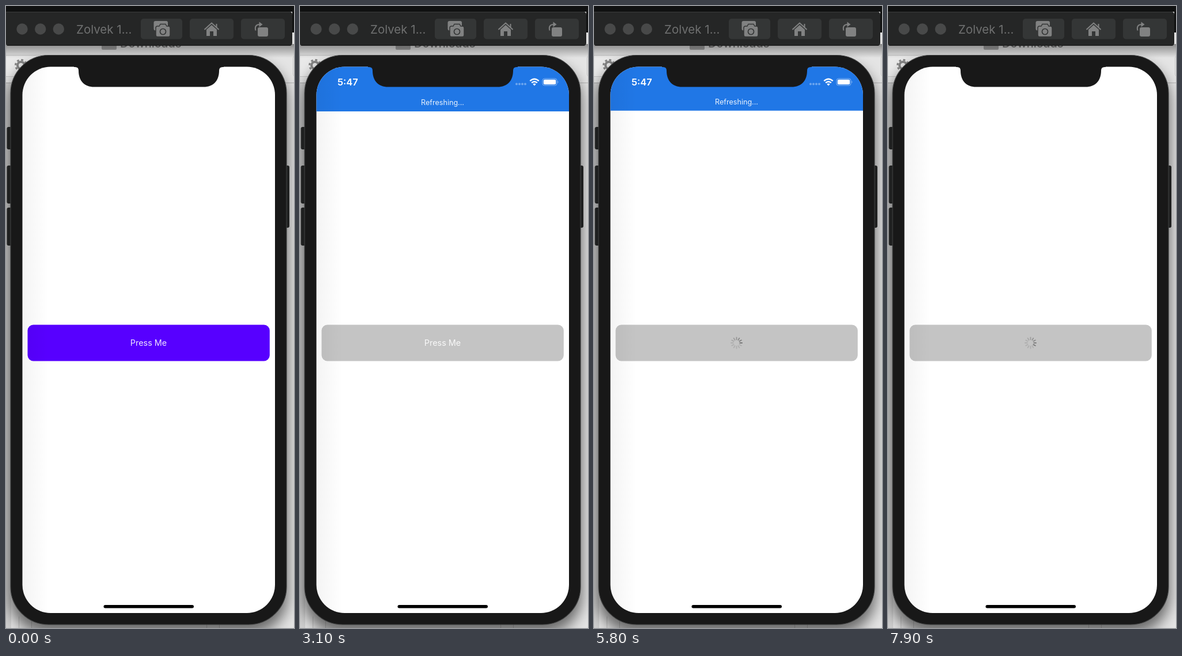
Recreate the animation shown at these times as an HTML page. Size 500 by 1080 pixels, loop 8 s.

```html
<!DOCTYPE html>
<html lang="en">
<head>
<meta charset="utf-8">
<title>Press Me</title>
<style>
  html, body { margin: 0; width: 100%; height: 100%; overflow: hidden; background: #111; }
  svg { display: block; width: 500px; height: 1080px; }
  text { font-family: Inter, "Liberation Sans", sans-serif; }
</style>
</head>
<body>
<svg viewBox="0 0 500 1080">
  <defs>
    <linearGradient id="edge">
      <stop offset="0" stop-opacity=".045"/>
      <stop offset=".5" stop-opacity=".022"/>
      <stop offset="1" stop-opacity="0"/>
    </linearGradient>
    <linearGradient id="barShade" x2="0" y2="1">
      <stop offset="0" stop-opacity=".4"/>
      <stop offset="1" stop-opacity="0"/>
    </linearGradient>
    <filter id="blur" x="-20%" y="-20%" width="140%" height="140%">
      <feGaussianBlur stdDeviation="12"/>
    </filter>
    <clipPath id="screen"><rect x="28.5" y="105.5" width="438.5" height="948.5" rx="49"/></clipPath>
  </defs>

  <!-- window behind the device -->
  <rect width="500" height="1080" fill="#e4e4e4"/>
  <path d="M0 133.5H500" stroke="#b4b4b4"/>
  <rect x="-8" y="85.500" width="171" height="37" rx="5" fill="#e9e9e9" stroke="#c4c4c4"/>
  <rect x="498.500" y="86" width="20" height="37" rx="5" fill="#eee" stroke="#c4c4c4"/>
  <path d="M22.500 1060V1080M44.500 1060V1080M348.500 1060V1080M370.500 1060V1080" stroke="#c2c2c2"/>
  <g stroke="#848484" fill="none">
    <circle cx="26" cy="103" r="6" stroke-width="4"/>
    <circle cx="26" cy="103" r="9.500" stroke-width="3" stroke-dasharray="3.730"/>
  </g>
  <rect x="166" y="54" width="26" height="22" rx="2" fill="#a2a2a2"/>
  <text x="198" y="72" font-size="20" font-weight="500" fill="#777">Downloads</text>
  <rect x="5" y="100" width="484" height="990" rx="66" opacity=".55" filter="url(#blur)"/>
  <rect y="133" width="9" height="947" opacity=".09"/>
  <rect y="66" width="500" height="24" fill="url(#barShade)"/>

  <!-- title bar -->
  <path d="M0 0H500V46H497V10H0Z" fill="#101111"/>
  <path d="M0 10H492Q497 10 497 15V64Q497 69 492 69H4Q0 69 0 65Z" fill="#252626"/>
  <path d="M0 10.500H493" stroke="#3b3c3c"/>
  <path d="M2 68.500H494" stroke="#121212"/>
  <g fill="#484949">
    <circle cx="28" cy="40" r="9.700"/><circle cx="59.700" cy="40" r="9.700"/><circle cx="91.300" cy="40" r="9.700"/>
  </g>
  <text x="122" y="48" font-size="20.500" fill="#6f7070">Zolvek 1...</text>
  <g fill="#343636">
    <rect x="234" y="22" width="72" height="35.500" rx="5"/>
    <rect x="319" y="22" width="76" height="35.500" rx="5"/>
    <rect x="408" y="22" width="76" height="35.500" rx="5"/>
  </g>
  <g fill="#818282">
    <rect x="256.500" y="26" width="24.500" height="16.500" rx="3"/>
    <path d="M263 35H266L268 31.500H277L279 35H282Q285 35 285 38V50.500Q285 53.500 282 53.500H263Q260 53.500 260 50.500V38Q260 35 263 35Z" stroke="#343636" stroke-width="1.500"/>
    <circle cx="272.500" cy="44.500" r="5" fill="none" stroke="#343636" stroke-width="1.700"/>
    <path d="M348 41L357 33L366 41V52H360V44H354V52H348Z"/>
    <path d="M344.500 41L357 29.500L369.500 41M365.500 31V37" fill="none" stroke="#818282" stroke-width="2"/>
    <rect x="437" y="37" width="18" height="16" rx="3"/>
    <path d="M433.500 42.500C431.500 36 434 32 441 32" fill="none" stroke="#818282" stroke-width="2"/>
    <path d="M439.500 27.500L445.500 32L439.500 36.500Z"/>
  </g>

  <!-- device -->
  <g fill="#1f2020">
    <rect x="1.500" y="210" width="10" height="39" rx="3"/>
    <rect x="1.500" y="277" width="10" height="66" rx="3"/>
    <rect x="1.500" y="350" width="10" height="66" rx="3"/>
    <rect x="482" y="277" width="10" height="108" rx="3"/>
  </g>
  <rect x="8" y="85.500" width="479" height="988.500" rx="66" fill="#181818" stroke="#3d3e3e" stroke-width="1.200"/>

  <g clip-path="url(#screen)">
    <rect x="28" y="105" width="440" height="950" fill="#fff"/>
    <rect id="button" x="37.500" y="553.500" width="420.300" height="63" rx="10"/>
    <text id="label" x="247.500" y="590" font-size="14.400" text-anchor="middle" fill="#fff" opacity=".9">Press Me</text>
    <g id="spinner" transform="translate(247.500 585)" stroke="#737373" stroke-width="1.800" stroke-linecap="round"></g>
    <g id="banner">
      <rect x="28" y="105" width="440" height="79" fill="#2077e6"/>
      <text x="247.500" y="173" font-size="12.600" text-anchor="middle" fill="#fff" opacity=".9">Refreshing...</text>
    </g>
    <g fill="#fff">
      <text x="65" y="138" font-size="16.500" font-weight="600">5:47</text>
      <g opacity=".35">
        <circle cx="376" cy="135.500" r="2"/><circle cx="381" cy="135.500" r="2"/>
        <circle cx="386" cy="135.500" r="2"/><circle cx="391" cy="135.500" r="2"/>
      </g>
      <g fill="none" stroke="#fff" stroke-width="2.400">
        <path d="M399.300 130.200Q407 123.200 414.700 130.200"/>
        <path d="M402.200 133.300Q407 129 411.800 133.300"/>
      </g>
      <path d="M404.300 135.600Q407 133.400 409.700 135.600L407 138.500Z"/>
      <rect x="421" y="126" width="25" height="12" rx="3.500" fill="none" stroke="#fff" opacity=".45"/>
      <rect x="422.800" y="127.700" width="21.400" height="8.600" rx="2"/>
      <path d="M447.500 130Q449.500 132 447.500 134Z" opacity=".5"/>
    </g>
    <rect x="28.500" y="105" width="46" height="950" fill="url(#edge)"/>
  </g>
  <path d="M118 104V106H120Q126 106 126 112C126 130 136 140.500 153 140.500H343C360 140.500 370 130 370 112Q370 106 376 106H378V104Z" fill="#181818"/>
  <rect x="169.500" y="1040" width="156.500" height="5.400" rx="2.700"/>
</svg>
<script>
  const LOOP = 8000, STEP = 100;
  const SHOW = [2480, 5170], HOLD = 600, SLIDE = 250, BANNER_H = 79;
  const GREY_AT = 2700, LOADING_AT = 5400;
  const SPOKES = 12, TURN = 1000, PHASE = 5.5;

  const $ = id => document.getElementById(id);
  const button = $('button'), label = $('label'), spinner = $('spinner'), banner = $('banner');
  const show = (el, on) => el.setAttribute('visibility', on ? 'visible' : 'hidden');

  const spokes = Array.from({ length: SPOKES }, (_, i) => {
    const line = document.createElementNS('http://www.w3.org/2000/svg', 'line');
    line.setAttribute('y1', -5.7);
    line.setAttribute('y2', -9.6);
    line.setAttribute('transform', `rotate(${i * 360 / SPOKES})`);
    return spinner.appendChild(line);
  });

  const easeInOut = p => p < .5 ? 2 * p * p : 1 - 2 * (1 - p) ** 2;

  function drawBanner(t) {
    const start = SHOW.find(s => t >= s && t < s + HOLD + SLIDE);
    show(banner, start !== undefined);
    if (start === undefined) return;
    const p = Math.max(0, (t - start - HOLD) / SLIDE);
    banner.setAttribute('transform', `translate(0 ${-BANNER_H * easeInOut(p)})`);
  }

  function drawSpinner(t) {
    const head = Math.floor(t / TURN * SPOKES + PHASE);
    spokes.forEach((line, i) => {
      const age = (head - i + SPOKES * 2) % SPOKES;
      line.setAttribute('opacity', Math.max(.25, .95 - age * .12));
    });
  }

  function draw(t) {
    const loading = t >= LOADING_AT;
    button.setAttribute('fill', t < GREY_AT ? '#5700ff' : '#c4c4c4');
    show(label, !loading);
    show(spinner, loading);
    drawBanner(t);
    drawSpinner(t);
  }

  const origin = performance.now();
  function tick() {
    const t = (performance.now() - origin) % LOOP;
    draw(Math.floor(t / STEP) * STEP);
    requestAnimationFrame(tick);
  }
  tick();
</script>
</body>
</html>
```
